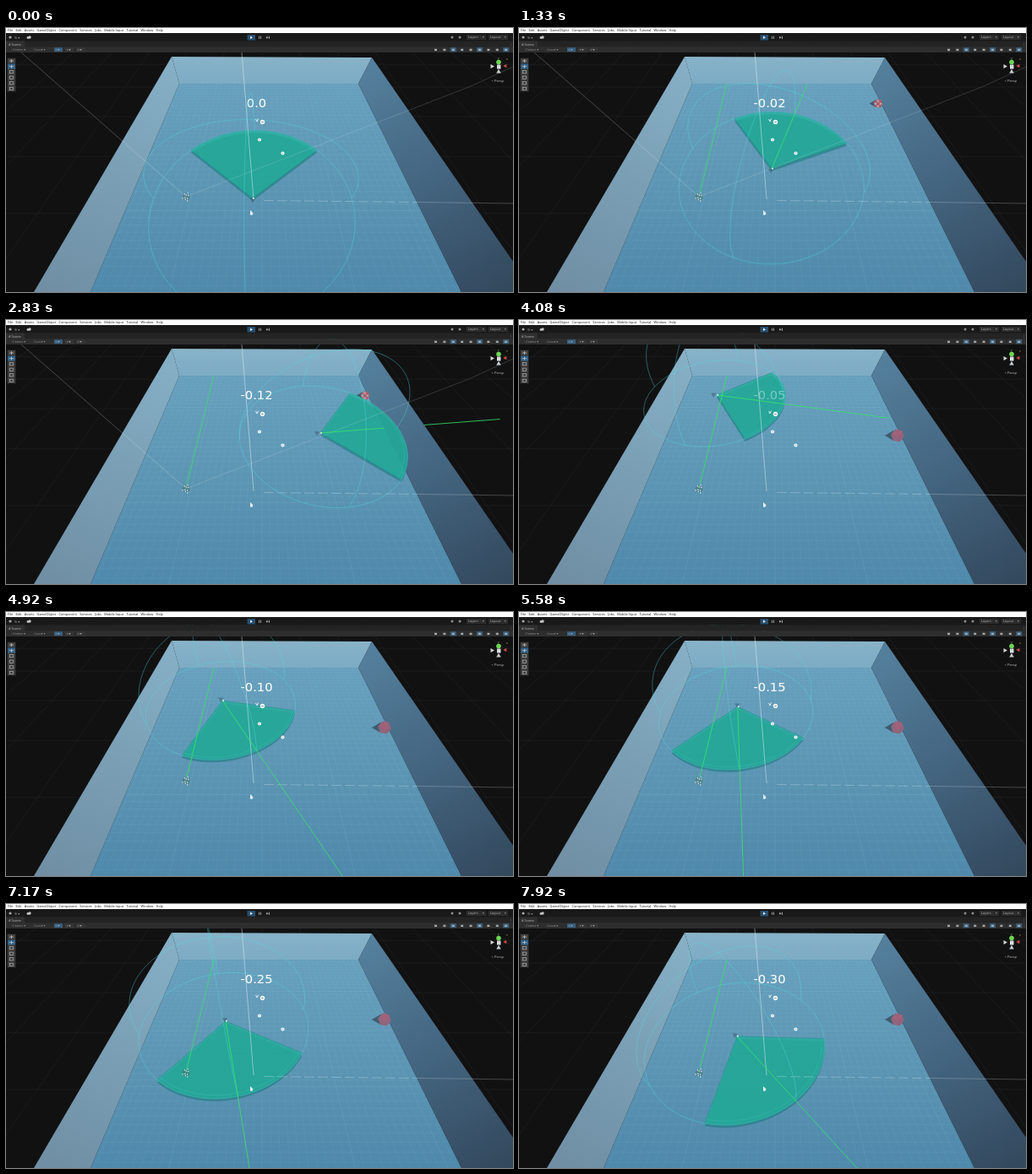
An HTML page with a canvas that plays this animation: 600 px wide and 313 px high, repeating every 8 s.

```html
<!DOCTYPE html>
<html lang="en">
<head>
<meta charset="utf-8">
<title>Agent vision scene</title>
<style>
html, body { margin: 0; width: 100%; height: 100%; overflow: hidden; background: #111; }
canvas { display: block; }
</style>
</head>
<body>
<canvas id="stage" width="600" height="313"></canvas>
<script>
const ctx = document.getElementById('stage').getContext('2d');
const LOOP = 8000, FPS = 12;
const DEG = Math.PI / 180, TURN = 2 * Math.PI;
const UI = '"Open Sans", sans-serif';

// Camera above the pool: screen centre, focal length, height and pitch.
const CAM = { x: 303, y: 171, f: 246, h: 6.41, pitch: Math.atan(335 / 246) };
const SIN = Math.sin(CAM.pitch), COS = Math.cos(CAM.pitch);
const RADIUS = 3.47, HALF_ANGLE = 49 * DEG, RAY = 8.37;

// Each episode: seconds at which its penalty starts, then waypoints.
const START = .333, PAUSE = [.667, 1], RESET = 3.55;
const EPISODES = [
  { clock: 1, path: [
    { t: START, x: -.33, z: 3.57, turn: 0 },
    { t: 1, x: -.13, z: 4.88, turn: 18 },
    { t: 2.5, x: 2.51, z: 6.38, turn: 84 },
    { t: 3.3, x: 3.75, z: 7.1, turn: 45 }] },
  { clock: 3.38, path: [
    { t: RESET, x: -3.8, z: 9, turn: 75 },
    { t: 4.083, x: -2.95, z: 9.07, turn: 102 },
    { t: 4.917, x: -1.89, z: 8.01, turn: 151 },
    { t: 6.333, x: -1.56, z: 7.07, turn: 197 },
    { t: 7.917, x: -1.52, z: 5.3, turn: 141 }] }
];

const BACK_L = [205, 66], BACK_R = [417, 66], FRONT_L = [100, 313], FRONT_R = [539, 313];
const RIM_L = [196, 34], RIM_R = [433, 35], RIM_FL = [33, 313], RIM_FR = [625, 313];

const clamp = (v, lo, hi) => Math.min(hi, Math.max(lo, v));
const mix = (a, b, u) => a + (b - a) * u;
const range = (n, fn) => Array.from({ length: n }, (_, i) => fn(i));
const polar = (x, y, r, a) => [x + r * Math.cos(a), y + r * Math.sin(a)];

function stateAt(t) {
  const first = t < RESET;
  const { clock, path } = EPISODES[first ? 0 : 1];
  const walked = first ? t - clamp(t - PAUSE[0], 0, PAUSE[1] - PAUSE[0]) : t;
  const i = clamp(path.findIndex(p => p.t > walked), 0, path.length - 1) || (walked < path[0].t ? 1 : path.length - 1);
  const a = path[i - 1], b = path[i];
  const u = clamp((walked - a.t) / (b.t - a.t), 0, 1);
  return {
    x: mix(a.x, b.x, u), z: mix(a.z, b.z, u),
    heading: mix(a.turn, b.turn, u) * DEG,
    penalty: Math.max(0, t - clock) / 15
  };
}

function project(x, y, z) {
  const drop = CAM.h - y;
  const depth = z * COS + drop * SIN;
  return [CAM.x + CAM.f * x / depth, CAM.y - CAM.f * (z * SIN - drop * COS) / depth];
}

function trace(points, path = ctx) {
  points.forEach(([x, y], i) => i ? path.lineTo(x, y) : path.moveTo(x, y));
}
function poly(points, fill) {
  ctx.beginPath(); trace(points); ctx.closePath();
  ctx.fillStyle = fill; ctx.fill();
}
function line(points, color, width = .7) {
  ctx.beginPath(); trace(points);
  ctx.strokeStyle = color; ctx.lineWidth = width; ctx.stroke();
}
function ngon(n, x, y, r, turn, color) {
  poly(range(n, i => polar(x, y, r, turn + i / n * TURN)), color);
}
function box(x, y, w, h, color) { ctx.fillStyle = color; ctx.fillRect(x, y, w, h); }
function dot(x, y, r, color) {
  ctx.beginPath(); ctx.arc(x, y, r, 0, TURN); ctx.fillStyle = color; ctx.fill();
}
function label(text, x, y, size, color, family = UI, align = 'left') {
  ctx.font = `${size}px ${family}`;
  ctx.textAlign = align; ctx.fillStyle = color; ctx.fillText(text, x, y);
  return ctx.measureText(text).width;
}
function shade(x0, y0, x1, y1, ...colors) {
  const g = ctx.createLinearGradient(x0, y0, x1, y1);
  colors.forEach((c, i) => g.addColorStop(i / (colors.length - 1), c));
  return g;
}
function groundGrid(x0, x1, z0, z1, step, color) {
  ctx.beginPath();
  for (let x = x0; x <= x1; x += step) trace([project(x, 0, z0), project(x, 0, z1)]);
  for (let z = z0; z <= z1; z += step) trace([project(x0, 0, z), project(x1, 0, z)]);
  ctx.strokeStyle = color; ctx.lineWidth = .6; ctx.stroke();
}

const floorPath = new Path2D();
trace([BACK_L, BACK_R, FRONT_R, FRONT_L], floorPath);
floorPath.closePath();
// Everything the pool walls do not cover.
const openArea = new Path2D(floorPath);
openArea.rect(0, 29, 640, 284);
trace([RIM_L, RIM_R, RIM_FR, RIM_FL], openArea);
openArea.closePath();

function drawPool() {
  box(0, 29, 600, 284, '#111112');
  groundGrid(-30, 30, -2, 28, 2.5, 'rgba(255,255,255,.07)');
  ctx.save();
  ctx.clip(floorPath);
  box(0, 60, 600, 253, shade(0, 66, 0, 313, '#679fbd', '#5c95b3', '#4e88ab'));
  groundGrid(-5, 5.5, .6, 10.9, .25, 'rgba(150,200,220,.14)');
  groundGrid(-5, 5.5, .6, 10.9, 2.5, 'rgba(150,200,220,.1)');
  ctx.restore();
  poly([RIM_L, RIM_R, BACK_R, BACK_L], shade(0, 34, 0, 66, '#88b3c8', '#7cabc4'));
  poly([RIM_L, BACK_L, FRONT_L, RIM_FL], shade(200, 40, 60, 312, '#86b0c6', '#7a9fb5', '#708fa4'));
  poly([RIM_R, RIM_FR, FRONT_R, BACK_R], shade(425, 45, 580, 313, '#54809d', '#446580', '#33495e'));
}

function drawGuides(t) {
  if (t < RESET) {
    line([[18, 29], [213, 200]], 'rgba(225,235,240,.36)');
    line([[213, 200], [550, 69], [600, 46]], 'rgba(225,235,240,.24)');
  }
  line([[279, 29], [293, 203]], 'rgba(235,242,245,.6)', .8);
  ctx.setLineDash([12, 4]);
  line([[305, 204.5], [487, 206.5]], 'rgba(220,235,242,.45)');
  ctx.setLineDash([]);
  line([[487, 206.5], [600, 208]], 'rgba(225,235,240,.36)');
}

function drawGoal(t) {
  if (t < START) return;
  const far = t < RESET;
  const [x, y, r] = far ? [425, 89.5, 5.5] : [448, 137, 8];
  ngon(3, x - r, y, r * .9, Math.PI, 'rgba(50,72,91,.75)');
  ngon(6, x, y, r, .2, far ? '#a8707e' : '#92647a');
  if (far) range(9, i => box(x - 4 + i % 3 * 3, y - 3.5 + (i / 3 | 0) * 3, 1.5, 1.5, i % 2 ? '#d8b5bc' : '#bd4050'));
  else ngon(4, x + .5, y - 2.5, 5.5, 0, '#a0627a');
}

function drawScore(penalty, alpha) {
  ctx.globalAlpha = alpha;
  const text = penalty ? (-penalty).toFixed(2) : '0.0';
  label(text, 296.5, 94.3, 14.7, '#f7fafa', '"DejaVu Sans", sans-serif', 'center');
  ctx.globalAlpha = 1;
}

function drawFan(s) {
  const tip = project(s.x, 0, s.z);
  const arc = r => range(33, i => {
    const a = s.heading + HALF_ANGLE * (i / 16 - 1);
    return project(s.x + Math.sin(a) * r, 0, s.z + Math.cos(a) * r);
  });
  const fan = [tip, ...arc(RADIUS)];
  poly(fan.map(([x, y]) => [x, y + 3]), 'rgba(18,118,116,.5)');
  poly(fan, 'rgba(36,174,155,.8)');
  line([...fan, tip], 'rgba(20,130,125,.5)');
  line(arc(RADIUS * .965), 'rgba(80,210,190,.3)');
}

function drawSphere(s) {
  const sin = Math.sin(s.heading), cos = Math.cos(s.heading);
  const ring = (sweep, place) => line(range(73, i => {
    const [u, v] = polar(0, 0, RADIUS, i / 72 * sweep);
    const [side, up, ahead] = place(u, v);
    return project(s.x + side * cos + ahead * sin, up, s.z - side * sin + ahead * cos);
  }), 'rgba(80,222,220,.48)', .8);
  ring(TURN, (u, v) => [u, 0, v]);
  ring(Math.PI, (u, v) => [u, v, 0]);
  ring(Math.PI, (u, v) => [0, v, u]);
}

function drawRay({ x, z, heading }) {
  ctx.save();
  ctx.clip(openArea, 'evenodd');
  const end = project(x + Math.sin(heading) * RAY, 0, z + Math.cos(heading) * RAY);
  line([project(x, 0, z), end], 'rgba(55,228,105,.9)', .9);
  ctx.restore();
}

function drawAgent(s) {
  const [x, y] = project(s.x, 0, s.z);
  ngon(3, x - Math.sin(s.heading) * 4, y + Math.cos(s.heading) * 2, 3.5, Math.PI / 2, 'rgba(55,85,105,.5)');
  dot(x + 1, y, 1, '#e5f1f1');
}

function drawWatcher() {
  dot(213, 200, 4.5, 'rgba(70,105,112,.45)');
  range(12, i => {
    const [x, y] = polar(212.5, 199.5, 1.5 + i * .32, i * 2.4);
    box(x, y, 1.3, 1.3, i % 4 ? '#d9e8ea' : '#3f8d6c');
  });
}

function drawIcons() {
  dot(303.5, 111.5, 2.7, '#f4f7f7');
  box(302, 111, 3, 1, '#82a7ae');
  line([[295.5, 108], [297, 111], [298.5, 107.5]], '#edf5f5', .9);
  for (const [x, y] of [[300, 132.5], [327.5, 148.5]]) {
    dot(x, y, 2.1, '#f4f7f7');
    dot(x, y, .7, '#92aeb7');
  }
  poly([[289, 216], [289, 221.5], [291.2, 222], [292.5, 219.5]], '#edf2f4');
}

function drawGizmo() {
  const x = 583, y = 46;
  ngon(3, x - 8, y - .5, 3, 0, '#d0d4d5');
  ngon(3, x + 8, y - 1, 2.6, Math.PI, '#cf4b45');
  ngon(3, x, y + 6, 3.2, -Math.PI / 2, '#c9cdcf');
  dot(x, y - 5.5, 2.8, '#6fd652');
  box(x - 2, y - 2.5, 4.5, 5, '#d8dcdc');
  label('y', x - 1, y - 9, 3.6, '#8cc870');
  label('x', x + 9, y - 8, 3.6, '#c9a44f');
  label('< Persp', 574.5, 63.7, 4.2, '#c0c4c7');
}

function drawEditor() {
  box(0, 0, 600, 6, '#fbfbfb');
  let x = 2;
  for (const text of 'File,Edit,Assets,GameObject,Component,Services,Jobs,Mobile Input,Tutorial,Window,Help'.split(','))
    x += label(text, x, 4.3, 3.9, '#222') + 3.3;

  box(0, 6, 600, 9.5, '#191919');
  dot(5, 11, 1.6, '#aaa');
  label('Vi ▾', 10, 12.5, 3.8, '#b5b5b5');
  dot(26, 11.5, 1.4, '#c4c4c4'); dot(28, 11, 1.7, '#c4c4c4');
  box(285.5, 8, 9.5, 6.5, '#28506f');
  ngon(3, 290, 11.2, 2, 0, '#dfeaf2');
  for (const bar of [299, 301, 311]) box(bar, 9.6, .9, 3.3, '#aaa');
  ngon(3, 309, 11.2, 1.8, 0, '#aaa');
  for (const icon of [528, 537]) dot(icon, 11, 1.5, '#8e8e8e');
  for (const [text, left] of [['Layers', 547], ['Layout', 573]]) {
    box(left - 2, 8, 23, 6, '#2c2c2c');
    label(text, left, 12.4, 3.9, '#b5b5b5');
    label('▾', left + 17, 12.3, 3.5, '#aaa');
  }

  box(0, 15.5, 600, 7, '#242424');
  box(0, 15.5, 22, 7, '#303030');
  label('# Scene', 3, 20.5, 4, '#c0c0c0');
  label('⋮', 595, 20.5, 4.5, '#aaa');
  box(0, 22.5, 600, 6.5, '#2e2e2e');
  label('▫ Center ▾', 6, 27.2, 3.8, '#999');
  label('▫ Local ▾', 32, 27.2, 3.8, '#999');
  range(3, i => {
    box(57 + i * 13, 23.2, 10, 5, i ? '#363636' : '#38607f');
    label('⌗ ▾', 58.5 + i * 13, 27.2, 3.8, '#bbb');
  });
  range(9, i => {
    const left = 506 + i * 10.4;
    if (i % 3 === 2) box(left - 1, 23.2, 7, 5, '#38607f');
    box(left + 1, 24.7, 3, 2.4, '#a4a9ac');
  });

  box(1.5, 35.5, 10, 40, '#292929');
  range(6, i => {
    const y = 36 + i * 6.6;
    box(2, y, 9, 6, i === 1 ? '#35658b' : '#414141');
    if (i < 2) {
      line([[4, y + 3], [9, y + 3]], '#d4d4d4');
      line([[6.5, y + 1], [6.5, y + 5]], '#d4d4d4');
    } else {
      ctx.strokeStyle = '#b0b0b0'; ctx.lineWidth = .7;
      ctx.strokeRect(4.5, y + 1.3, 4, 3.3);
    }
  });
}

function draw(t) {
  const s = stateAt(t);
  drawPool();
  drawGoal(t);
  drawScore(s.penalty, 1);
  drawFan(s);
  drawScore(s.penalty, .35);
  drawGuides(t);
  drawSphere(s);
  if (t >= START - .01) {
    drawRay({ x: -2.68, z: 3.64, heading: 0 });
    drawRay(s);
  }
  drawWatcher();
  drawAgent(s);
  drawIcons();
  drawGizmo();
  drawEditor();
}

function frame(now) {
  draw(Math.floor((now % LOOP + 4) * FPS / 1000) / FPS);
  requestAnimationFrame(frame);
}
draw(0);
requestAnimationFrame(frame);
</script>
</body>
</html>
```
